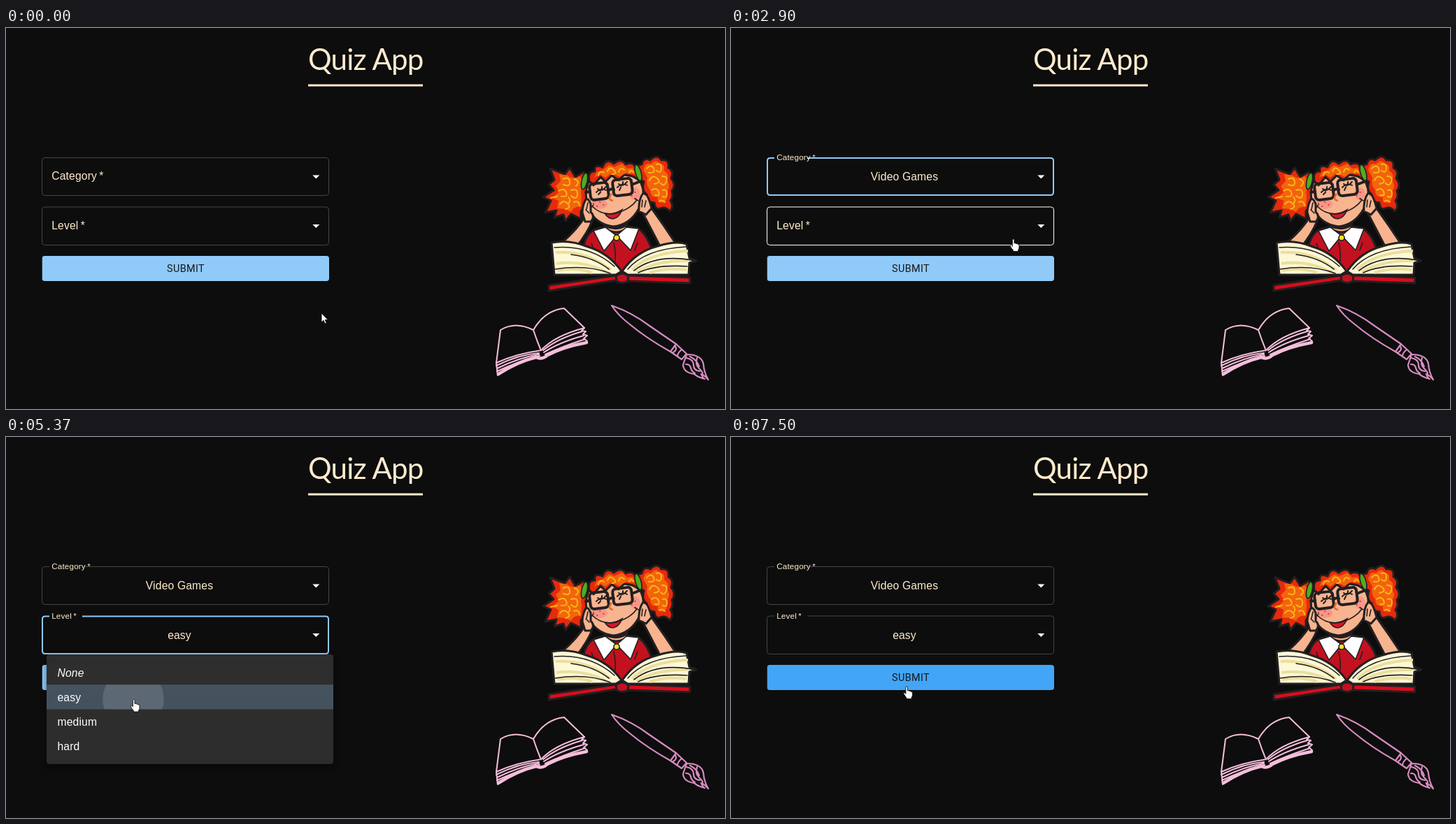
Write an HTML page that moves like this. It is 1028 by 545 pixels and loops after 8000 ms.

```html
<!DOCTYPE html>
<html lang="en">
<head>
<meta charset="utf-8">
<title>Quiz App</title>
<style>
html, body { margin: 0; width: 100%; height: 100%; overflow: hidden; background: #0d0d0d; }
svg { display: block; width: 1028px; height: 545px; }
text { font: 15.7px "Liberation Sans", Arial, sans-serif; letter-spacing: .147px; fill: #ffebcd; }
.title { font: 42px Lato, sans-serif; letter-spacing: -.75px; }
.button { font: 14.4px Roboto, sans-serif; letter-spacing: .38px; fill: #16191d; }
.menu { filter: drop-shadow(0 4px 5px rgba(0, 0, 0, .45)); }
.menu text { fill: #fff; }
.paper { fill: #2e2e2e; }
.none { font-style: italic; }
.mid { text-anchor: middle; }
.line { fill: none; }
.ink { stroke: #231f20; stroke-width: 3; stroke-linejoin: round; stroke-linecap: round; }
.thin { stroke-width: 1.6; }
.skin { fill: #f7b48f; }
.red { fill: #e62a0c; }
.orange { fill: #f2640d; }
.curl { fill: none; stroke: #fdb515; stroke-width: 2; stroke-linecap: round; }
.dress { fill: #c4111f; }
.page { fill: #fdf8d6; }
.shade { fill: none; stroke: #ebdf9d; stroke-width: 4; }
.pink { fill: none; stroke: #f5bedb; stroke-width: 2; stroke-linejoin: round; stroke-linecap: round; }
.mauve { fill: none; stroke: #d78cc0; stroke-width: 2.2; stroke-linejoin: round; stroke-linecap: round; }
.cursor { fill: #fff; stroke: #111; stroke-width: .9; stroke-linejoin: round; }
</style>
</head>
<body>
<svg viewBox="0 0 1028 545">
  <defs>
    <clipPath id="rowClip"><rect x="58" y="354.2" width="410" height="35.3"/></clipPath>
    <clipPath id="buttonClip"><rect x="51.5" y="326" width="410.5" height="36" rx="4"/></clipPath>
    <clipPath id="listClip"><rect x="58" y="16" width="410" height="513" rx="4"/></clipPath>
  </defs>

  <g id="title">
    <text class="title" x="432" y="60">Quiz App</text>
    <rect x="432" y="80.5" width="164" height="3" fill="#ffebcd"/>
  </g>

  <g id="art">
    <!-- girl -->
    <path class="ink red" d="M832 216L826 206 814 213 806 200 799 209 778 201 784 217 776 224 783 232 768 242 779 247 771 264 787 261 784 271 797 267 800 276 808 266 822 273 822 262 832 250 830 235Z"/>
    <path class="orange" d="M803 211Q812 218 820 212L828 222Q820 232 823 240L822 256Q812 254 808 263L799 259 788 258 790 247 781 243 791 234 786 226 793 219 791 209Z"/>
    <path class="curl" d="M797 216q8-4 9 4t-9 4M813 216q9 4 2 10M790 233q8-5 11 2t-7 6M808 232q10-3 9 6t-9 2M792 252q5-7 11-1t-3 8M812 249q7-3 8 5M779 243l9-2M804 242q4 3 1 8"/>
    <path class="ink red" d="M899 206Q899 196 909 195 912 184 921 189 931 179 937 189 949 187 947 200 956 205 951 215 959 225 952 233 955 242 950 247 956 255 949 262 942 255 936 258 928 261 927 250 916 250 916 238 908 232 912 220 902 216 899 206Z"/>
    <path class="orange" d="M911 203Q914 191 922 195 930 186 935 195 943 194 941 204 950 210 945 217 951 226 946 232 947 244 941 250 930 251 932 242 921 243 921 232 914 224 917 214Z"/>
    <path class="curl" d="M916 201q7-7 10 0t-7 6M930 195q8-2 7 6t-7 3M920 218q4-9 11-3t-4 8M938 212q9 0 6 8t-8 2M923 232q7-5 10 2t-5 5M939 232q6-2 6 5t-6 4M934 248q5-3 8 1"/>
    <path class="ink skin" d="M829 268Q817 288 795 307L815 314Q832 292 838 276Z"/>
    <path class="ink skin" d="M908 260Q919 281 935 312L960 312Q942 284 921 255Z"/>
    <path class="ink dress" d="M824 319Q828 295 842 288L858 284 887 284 903 286Q917 296 924 319L882 350Z"/>
    <path class="ink skin" d="M855 277L888 275 887 287Q873 297 857 287Z"/>
    <path d="M857 279Q872 289 887 277L887 284Q872 292 857 285Z" fill="#231f20"/>
    <path class="ink thin" d="M840 290L857 285 873 297 855 319ZM873 297L887 285 905 287 893 318Z" fill="#fff"/>
    <path class="ink thin line" d="M869 307Q873 327 870 337M899 318l4-11M841 319l-4-11"/>
    <circle class="ink thin" cx="873" cy="300" r="4" fill="#f7e51c"/>
    <path class="ink skin" d="M832 222Q850 208 872 209 898 207 908 222 916 240 905 258 892 282 868 284 842 280 833 258 826 240 832 222Z"/>
    <g fill="#f58e83" opacity=".75"><ellipse cx="848" cy="252" rx="12" ry="7"/><ellipse cx="899" cy="237" rx="8" ry="9"/></g>
    <path class="line" d="M840 251h.1m5 4h.1m4-6h.1m5 4h.1m41-23h.1m4 5h.1m-5 5h.1m5 4h.1" stroke="#d4282a" stroke-width="2" stroke-linecap="round"/>
    <path class="ink red" d="M834 219Q831 205 842 205 840 194 853 199 858 185 869 194 880 185 886 195 899 190 901 203 911 208 906 218L896 212 884 210 876 218 866 211 857 220 850 213 840 225Z"/>
    <path class="orange" d="M841 214L845 206 854 203 862 196 870 199 881 194 888 201 896 200 900 209 887 207 877 213 866 207 857 214 849 209Z"/>
    <path class="curl" d="M847 211q2-8 8-4M860 205q3-8 9-2t-3 6M876 206q2-8 8-3M891 207q2-6 6-1"/>
    <ellipse class="ink thin" cx="827" cy="219" rx="4" ry="12" fill="#4dae21" transform="rotate(12 827 219)"/>
    <ellipse class="ink thin" cx="904" cy="207" rx="4" ry="12" fill="#4dae21" transform="rotate(-16 904 207)"/>
    <g class="line ink" style="stroke-width:4">
      <rect x="835" y="222" width="26" height="23" rx="5" transform="rotate(-7 848 234)"/>
      <rect x="868" y="216" width="27" height="23" rx="5" transform="rotate(-7 882 228)"/>
      <path d="M861 233q4-4 8-2M835 234l-6 1M895 224l10-4"/>
    </g>
    <path class="ink line" style="stroke-width:2" d="M844 235q7-7 14-3M846 230l4 3M852 227v5M858 227l-4 4M850 235l-3 3M874 228q7-7 14-3M876 223l4 3M882 220v5M888 220l-4 4M879 228l-2 4"/>
    <path d="M866 237Q859 246 868 247" class="line" stroke="#e06a30" stroke-width="2.5"/>
    <path d="M856 265Q868 268 881 260 876 272 868 273 861 273 856 265Z" fill="#d6142a" stroke="#231f20" stroke-width="1.6"/>
    <path class="ink line thin" d="M838 255Q852 269 872 265 893 259 902 246M836 257l4-4M899 244l5 3"/>
    <path class="ink skin" d="M829 245Q824 254 824 264L828 277 836 277Q843 270 836 263L836 252Q833 243 829 245Z"/>
    <path class="ink skin" d="M911 236Q904 246 905 262L915 267 923 258Q920 245 916 239Z"/>
    <path class="ink line thin" d="M829 260l5 5M832 250l-2 9M910 246l-1 10M915 247l-2 9"/>
    <!-- open book on the desk -->
    <path class="ink" d="M776 368L872 354 890 354 978 357 978 365 890 362Q881 367 872 361L776 376Z" fill="#d90d1c"/>
    <path class="ink page" d="M780 307Q805 302 832 313 862 322 880 348L872 353 784 353Z"/>
    <path class="ink page" d="M881 348Q900 320 932 312 958 304 973 309L977 329 987 333 977 336 976 353 889 353Z"/>
    <path class="shade" d="M786 321Q830 318 865 346M787 337Q825 332 858 349M788 347Q815 342 838 350M975 319Q920 321 895 346M975 333Q930 332 902 349M973 346Q945 342 920 350"/>
    <path class="ink line thin" d="M784 314Q835 310 870 341M808 324Q840 328 862 345M785 345Q830 338 864 351M972 313Q914 316 889 345M986 333Q930 322 898 347M974 341Q930 338 904 350"/>
    <path class="ink" d="M872 355Q881 347 890 355L889 362Q881 367 873 362Z" fill="#c4111f"/>

    <!-- sketched book -->
    <path class="pink" d="M707 432Q728 419 754 432 770 404 798 401L827 429Q785 440 765 461 728 466 701 479Z"/>
    <path class="pink" d="M754 432Q759 447 764 459M701 479L703 497"/>
    <path class="pink" d="M701 483Q733 467 762 465M702 487Q735 471 762 467M702 491Q737 475 763 469M827 429l-4 4 6 1-4 4 6 2-5 4 5 4M768 461Q789 444 824 434M769 464Q790 450 826 440M771 467Q794 456 828 445"/>
    <path class="pink" style="stroke-width:4.5" d="M704 495Q732 477 758 471 767 475 774 468 797 456 830 450"/>
    <!-- brush -->
    <path class="mauve" d="M866 397Q895 407 920 426L958 452 950 463Q916 444 892 424 875 411 866 397ZM958 452L973 466 966 474 950 463M957 455q3 6-3 9M966 460q-5 4-6 9"/>
    <path class="mauve" d="M973 467Q994 467 997 480 998 493 1004 503 999 497 994 495 997 502 999 502 988 499 984 495 969 493 968 482ZM973 472q10 2 10 10t9 9M988 472q-3 9 3 15t5 7M972 481q6 0 7 5t6 8M978 470q10 5 13 14"/>
  </g>

  <g id="form">
    <path id="catBox" class="line"/>
    <path id="lvlBox" class="line"/>
    <text id="catLabel">Category&#8201;*</text>
    <text id="lvlLabel">Level&#8201;*</text>
    <text id="catValue" class="mid" x="248" y="218">Video Games</text>
    <text id="lvlValue" class="mid" x="248" y="288.5">easy</text>
    <path d="M438.3 210.6h10l-5 5z" fill="#fff"/>
    <path id="lvlArrow" d="M438.3 281.1h10l-5 5z" fill="#fff"/>
    <g clip-path="url(#buttonClip)">
      <rect id="button" x="51.5" y="326" width="410.5" height="36"/>
      <circle id="pressRipple" cx="251.5" cy="357"/>
    </g>
    <text class="button mid" x="257" y="349">SUBMIT</text>
  </g>

  <g id="catMenu" class="menu">
    <g clip-path="url(#listClip)" id="catList"><rect class="paper" x="58" y="16" width="410" height="513"/></g>
  </g>
  <g id="lvlMenu" class="menu">
    <rect class="paper" x="58" y="311" width="410" height="156.8" rx="4"/>
    <rect id="noneRow" x="58" y="318.9" width="410" height="35.3" fill="#90caf9" fill-opacity=".16"/>
    <rect id="easyRow" x="58" y="354.2" width="410" height="35.3"/>
    <g clip-path="url(#rowClip)"><circle id="rowRipple" cx="182" cy="375" fill="#fff"/></g>
    <text class="none" x="73.5" y="342.5">None</text>
    <text x="73.5" y="378">easy</text>
    <text x="73.5" y="413">medium</text>
    <text x="73.5" y="448">hard</text>
  </g>

  <path id="arrow" class="cursor" d="M0 0V13L3 10.2 5 14.8 7.2 13.9 5.2 9.4H9.3Z"/>
  <path id="hand" class="cursor" d="M-1.6 1.2C-1.6-.5 1-.5 1 1.2V6L2 5.6Q3.2 5.6 3.5 6.6 5.6 6 6 7.4 8 7 8 9V12Q8 14 6.6 15.6V17.5H-.6V16Q-2.6 13.8-4.4 10.6-5.4 8.6-3.6 8.6L-1.6 10.3Z"/>
</svg>

<script>
const $ = id => document.getElementById(id);
const LOOP = 8000, STEP = 1000 / 15, PHASE = 29;
const GREY = '#454545', BLUE = '#90caf9', CREAM = '#fff';
const OPEN = 3878, CLOSE = 5350, LOCK = 3825, SUBMIT = 6890;

const clamp = x => Math.min(1, Math.max(0, x));
const lerp = (a, b, p) => a + (b - a) * p;
const span = (t, start, length) => clamp((t - start) / length);
const smooth = x => x * x * x * (10 + x * (6 * x - 15));

// cubic-bezier(x1, 0, .2, 1)
function bezier(x1) {
  return x => {
    if (x <= 0 || x >= 1) return clamp(x);
    let lo = 0, hi = 1;
    for (let i = 0; i < 24; i++) {
      const s = (lo + hi) / 2, r = 1 - s;
      if (3 * r * r * s * x1 + 3 * r * s * s * .2 + s * s * s < x) lo = s; else hi = s;
    }
    return lo * lo * (3 - 2 * lo);
  };
}
const ease = bezier(.4), easeOut = bezier(0);

// start, end, from x, from y, to x, to y
const moves = [
  [1095, 1362, 407.5, 263.5, 407.5, 302],
  [2829, 3362, 407.5, 302.5, 189, 272],
  [4220, 4695, 189, 272, 183, 375.5],
  [6029, 6500, 183, 375.5, 251.5, 357]
];
function pointer(t) {
  if (t < 490) return [451, 408];
  let [, , x, y] = moves[0];
  for (const [a, b, x0, y0, x1, y1] of moves) {
    if (t < a) break;
    const p = smooth(span(t, a, b - a));
    x = lerp(x0, x1, p);
    y = lerp(y0, y1, p);
  }
  return [x, y];
}

function set(id, attrs) {
  for (const key in attrs) $(id).setAttribute(key, attrs[key]);
}
const show = (id, on) => set(id, { display: on ? 'inline' : 'none' });

function outline(id, top, bottom, notch, color, width) {
  const inset = (width - 1) / 2, l = 51.5 + inset, r = 461.5 - inset;
  const y = top + inset, b = bottom - inset;
  set(id, {
    d: `M${notch ? 109 : 62} ${y}H${r - 4}q4 0 4 4V${b - 4}q0 4-4 4H${l + 4}q-4 0-4-4V${y + 4}q0-4 4-4H62`,
    stroke: color, 'stroke-width': width
  });
}

function label(id, y, p) {
  set(id, { transform: `translate(65.2 ${lerp(y, y - 28.2, p)}) scale(${lerp(1, .75, p)})` });
}

function ripple(id, t, start, radius, fade) {
  const p = ease(span(t, start, 550));
  set(id, { r: t < start ? 0 : p * radius, opacity: (.1 + .2 * p) * fade });
}

function draw(t) {
  const locked = t >= LOCK && t < CLOSE - 5;
  const picked = t >= 490, chosen = t >= CLOSE - 5;
  set('title', { transform: `translate(${locked ? 8.7 : 0} 0)` });
  set('form', { transform: locked ? 'translate(5.5 .5)' : '' });
  set('art', { transform: locked ? 'matrix(1.01 0 0 1.0145 4.1 -1.6)' : '' });

  const catFocus = picked && t < LOCK, lvlFocus = t >= LOCK && t < SUBMIT;
  const lvlHover = t >= 825 && t < LOCK;
  outline('catBox', 185.5, 239.5, picked, catFocus ? BLUE : GREY, catFocus ? 2 : 1);
  outline('lvlBox', 256, 310.5, t > OPEN, lvlFocus ? BLUE : lvlHover ? CREAM : GREY, lvlFocus ? 2 : 1);
  label('catLabel', 217.3, picked ? 1 : 0);
  label('lvlLabel', 287.8, easeOut(span(t, OPEN, 200)));
  show('catValue', picked);
  show('lvlValue', chosen);
  set('lvlArrow', { transform: locked ? 'rotate(180 443.3 283.6)' : '' });

  show('catMenu', picked && t < 825);
  const fade = ease(span(t, OPEN, 267)) - ease(span(t, CLOSE, 267));
  const grow = ease(span(t, OPEN, 178)) - ease(span(t, CLOSE + 89, 178));
  show('lvlMenu', fade > 0);
  set('lvlMenu', {
    opacity: fade,
    transform: `translate(263 311) scale(${lerp(.75, 1, grow)} ${lerp(.5625, 1, grow)}) translate(-263 -311)`
  });

  const [x, y] = pointer(t);
  const inMenu = fade > 0 && y > 319;
  show('noneRow', !chosen);
  set('easyRow', {
    fill: chosen ? BLUE : '#fff',
    'fill-opacity': chosen ? .24 : inMenu && y > 354 ? .08 : 0
  });
  ripple('rowRipple', t, 5247, 290, 1);

  const hover = ease(span(t, 6310, 250));
  const mix = (a, b) => Math.round(lerp(a, b, hover));
  set('button', { fill: `rgb(${mix(144, 66)},${mix(202, 165)},${mix(249, 245)})` });
  ripple('pressRipple', t, SUBMIT, 213, 1 - ease(span(t, 6960, 530)));

  const hand = picked && t < LOCK || inMenu || t >= 6310;
  show('hand', hand);
  show('arrow', !hand);
  set(hand ? 'hand' : 'arrow', { transform: `translate(${x} ${y})` });
}

const topics = ['General Knowledge', 'Books', 'Films', 'Music', 'Musicals and Theaters', 'Television',
  'Video Games', 'Board Games', 'Science and Nature', 'Computers', 'Mathematics', 'Mythology',
  'Sports', 'Geography', 'History'];
$('catList').innerHTML += topics.map((name, i) => {
  const top = 24 + 35.3 * i;
  const mark = name === 'Video Games'
    ? `<rect x="58" y="${top}" width="410" height="35.3" fill="${BLUE}" fill-opacity=".24"/>` : '';
  return `${mark}<text x="73.5" y="${top + 23.5}">${name}</text>`;
}).join('');

// The screen refreshes 15 times a second.
function tick() {
  const t = performance.now() % LOOP;
  draw(Math.max(0, Math.floor((t - PHASE) / STEP) * STEP + PHASE));
  requestAnimationFrame(tick);
}
tick();
</script>
</body>
</html>
```
